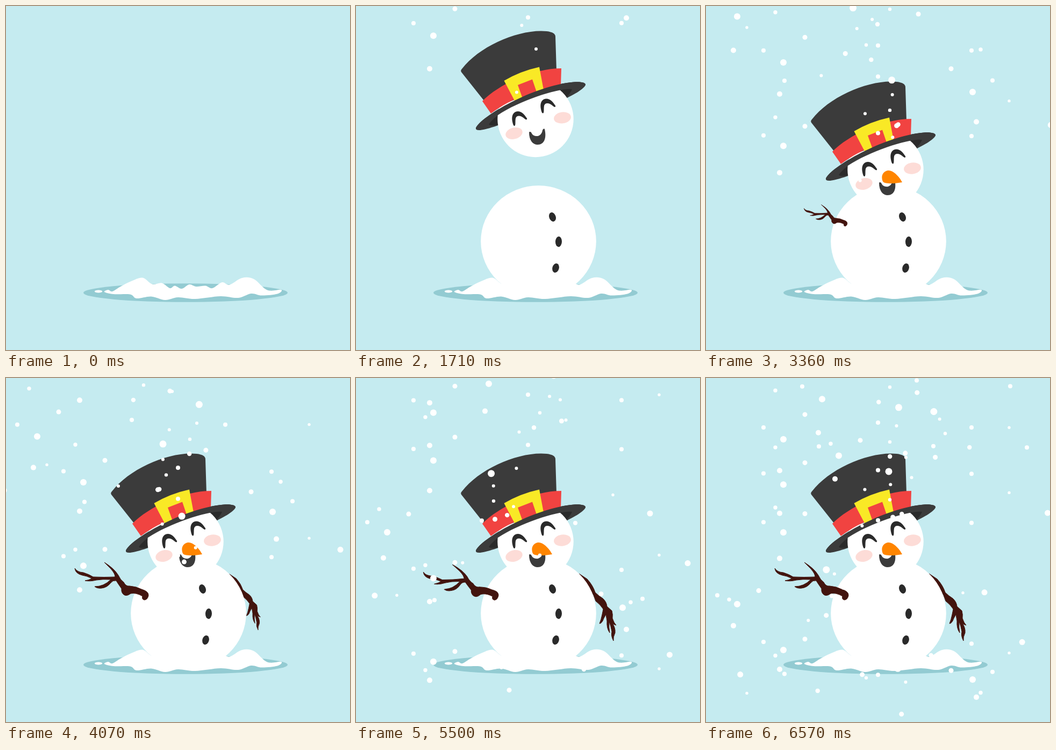
An HTML page with a canvas for the animation above (6.64 s loop, 640 by 640 pixels).

```html
<!DOCTYPE html>
<html lang="en">
<head>
<meta charset="utf-8">
<title>Snowman</title>
<style>
html, body { margin: 0; width: 100%; height: 100%; overflow: hidden; background: #c5ebf0; }
canvas { display: block; width: 100vmin; height: 100vmin; }
</style>
</head>
<body>
<canvas id="stage" width="640" height="640"></canvas>
<script>
const ctx = document.getElementById('stage').getContext('2d');
const SIZE = 640, LOOP = 6640, FPS = 14;
const DARK = '#3b3b3b', INK = '#2a2a2a', RED = '#f14341', WOOD = '#42140e', WHITE = '#fff';

const flake = (x, r, speed, enter, drift = 0) => ({ x, r, speed, enter, drift });

// One flurry: some flakes fall straight, the others drift sideways
const flurry = [
  flake(107, 4, .127, 1462),
  flake(129, 3.7, .157, 2038),
  flake(137, 5, .1177, 722),
  flake(144, 6, .1248, 1272),
  flake(184, 4.5, .133, 1675),
  flake(320, 4, .131, 1552),
  flake(342, 3.2, .151, 2073),
  flake(494, 4, .128, 1467),
  flake(564, 2.7, .17, 2318),
  flake(311, 3, .1, 110, -.0075),
  flake(312, 4.2, .15, 1887, .031),
  flake(363.6, 3, .153, 2278, -.0157),
  flake(367, 6.5, .167, 2532, -.0259),
  flake(398, 4.5, .167, 2023, -.0325),
  flake(685, 5.5, .137, 1741, -.027)
];

// The same flurry is replayed later, sometimes shifted or mirrored
const replays = [
  ...[0, 1244, 2998, 3711, 4386].map(delay => ({ delay })),
  { delay: 804, mirror: true },
  { delay: 1832, dx: -86, dy: -12 },
  { delay: 2258, dx: 103, dy: -235 },
  { delay: 4985, dx: 72 }
];

// Crests and dips around the snow heap
const heap = smoothLoop([
  [183, 532], [190, 528], [198, 531], [213, 522], [233, 512], [254, 505.5], [272, 517.5], [290, 515.5],
  [305, 525], [314, 520.5], [327, 526], [341, 518], [354, 522], [371, 520.5], [384, 525], [402, 514],
  [416, 518.5], [439, 506], [461, 508], [486, 528.5], [512, 528], [505, 535.5], [476, 538.5], [456, 535],
  [432, 543], [399, 540], [352, 545], [320, 542], [296, 547], [270, 540.5], [243, 544], [231, 536.5], [200, 536]
]);

const parts = {
  crown: new Path2D('M196 217Q194 214 197 211C230 168 305 136 355 141Q371 143 371 151L373 215L373 240L250 285Z'),
  band: new Path2D('M235 271C265 240 330 210 382 210L381 243C340 247 290 265 251 294Z'),
  buckle: new Path2D('M275.5 233Q306 215 341 207.5L349 250L296 272Z'),
  hole: new Path2D('M301 241L328 230.5L336 254L310 266Z'),
  brim: new Path2D('M223 321C232 300 330 242 405 235.500C420 234.5 428 237 427 241C420 257 350 285 300 302C270 315 240 325 229 325Q222 325 223 321Z'),
  inside: new Path2D('M247 314Q255 303 270 293L377 249Q395 247 402 249Q398 258 390 265L300 300L264 315Q250 318 247 314Z'),
  front: new Path2D('M223 321C232 300 330 242 405 235.5C420 234.5 428 237 427 241Q415 246 402 248.5C375 247 305 270 264 297Q252 305 248 313L232 322Z'),
  eye: new Path2D('M293 316C288 302 290 291 301 290C309 290 314 297 318 303C319 306 316 306 314 304C306 297 299 297 297 303C296 308 297 313 296 316Q295 318 293 316Z'),
  mouth: new Path2D('M322 329C322 344 329 352 338 352C350 352 355 340 351 323Q349 321 347 325C346 332 341 337 335 336C330 336 327 332 326 329Q323 327 322 329Z'),
  nose: new Path2D('M327.5 321C326 311 335 304 343 306.5C352 309 361 320 365 328C354 330 340 331 333 329C329 328 328 325 327.5 321Z'),
  leftArm: new Path2D('M128 354Q132 361 144 362Q154 365 162 370Q182 371 203 370Q203 364 195 355L183 343Q201 354 209 367Q213 376 219 380Q223 388 230 387Q243 388 252 393Q266 397 265 405Q263 413 257 413Q252 411 254 406Q242 399 232 401Q224 407 219 403Q214 399 215 392Q208 382 205 377Q199 376 195 381Q188 390 178 391Q170 392 165 388Q182 388 195 375Q180 374 168 376Q156 379 147 377Q154 376 160 373Q150 368 142 367Q129 364 128 354Z'),
  rightArm: new Path2D('M415 364L430 374Q441 386 445 399Q451 405 459 410Q466 416 467 425L476 433Q478 440 477 447Q480 456 484 460Q479 459 476 455Q483 464 482 474Q478 482 479 489Q474 480 476 472Q474 460 471 453Q470 464 472 474Q466 466 467 452L465 440Q460 448 459 452Q456 457 453 457Q456 450 458 440L460 430Q455 422 446 415Q443 404 436 394Q430 380 415 364Z')
};

// Closed curve through all points (Catmull-Rom)
function smoothLoop(points) {
  const path = new Path2D();
  const n = points.length;
  const at = i => points[(i + n) % n];
  path.moveTo(...at(0));
  for (let i = 0; i < n; i++) {
    const [a, b, c, d] = [at(i - 1), at(i), at(i + 1), at(i + 2)];
    path.bezierCurveTo(
      b[0] + (c[0] - a[0]) / 6, b[1] + (c[1] - a[1]) / 6,
      c[0] - (d[0] - b[0]) / 6, c[1] - (d[1] - b[1]) / 6,
      c[0], c[1]
    );
  }
  return path;
}

const ramp = (t, from, to) => Math.min(1, Math.max(0, (t - from) / (to - from)));

function fill(path, color) {
  ctx.fillStyle = color;
  ctx.fill(path);
}

function oval(x, y, rx, ry, color, deg = 0) {
  ctx.fillStyle = color;
  ctx.beginPath();
  ctx.ellipse(x, y, rx, ry, deg * Math.PI / 180, 0, Math.PI * 2);
  ctx.fill();
}

// Draws with a scale and turn about a fixed point
function about(x, y, sx, sy, deg, draw) {
  if (sx <= 0) return;
  ctx.save();
  ctx.translate(x, y);
  ctx.rotate(deg * Math.PI / 180);
  ctx.scale(sx, sy);
  ctx.translate(-x, -y);
  draw();
  ctx.restore();
}

function drawArm(path) {
  fill(path, WOOD);
  ctx.strokeStyle = WOOD;
  ctx.lineJoin = 'round';
  ctx.lineWidth = 1;
  ctx.stroke(path);
}

function drawBody() {
  oval(339.5, 437.8, 107.3, 103.7, WHITE);
  oval(365.5, 392.5, 6.2, 8.7, INK, -20);
  oval(377, 438.5, 6, 9.8, INK, 2);
  oval(371.5, 487.5, 6.2, 8.7, INK, 15);
}

function drawHead(t) {
  fill(parts.brim, DARK);
  fill(parts.inside, INK);
  oval(334, 304.5, 70.7, 70.7, WHITE);
  oval(294, 331, 16, 10.5, '#fddcd7', -15);
  oval(384, 302, 16, 10.5, '#fddcd7', -8);
  fill(parts.eye, INK);
  ctx.save();
  ctx.translate(53, -23.5);
  fill(parts.eye, INK);
  ctx.restore();
  fill(parts.mouth, DARK);
  const grow = ramp(t, 2500, 2937);
  about(330, 315, grow, grow, 0, () => fill(parts.nose, '#ff8500'));
  fill(parts.crown, DARK);
  fill(parts.band, RED);
  fill(parts.buckle, '#f9e926');
  fill(parts.hole, RED);
  fill(parts.front, DARK);
}

function drawFlurry(t, { delay, dx = 0, dy = 0, mirror = false }) {
  for (const f of flurry) {
    const age = t - delay - f.enter;
    const x = f.x + f.drift * age;
    const y = f.speed * age + dy;
    if (age < -60 || x > SIZE + f.r) continue;
    oval((mirror ? SIZE - x : x) + dx, y, f.r, f.r, WHITE);
  }
}

function draw(t) {
  ctx.fillStyle = '#c5ebf0';
  ctx.fillRect(0, 0, SIZE, SIZE);
  oval(334, 533.5, 190, 17.3, '#93cbd2');
  fill(heap, WHITE);
  oval(172, 531, 7.2, 2.6, WHITE);

  const right = ramp(t, 3707, 4144);
  about(419, 368, right, right, 0, () => drawArm(parts.rightArm));

  const body = ramp(t, 428, 830);
  const squash = .04 * Math.sin(Math.PI * ramp(t, 1930, 2430));
  about(339.5, 541.5, body * (1 + squash / 2), body * (1 - squash), 0, drawBody);

  const drop = ramp(t, 1070, 1930);
  if (drop > 0) {
    ctx.save();
    ctx.translate(0, -375 * (1 - drop) + 192 * squash);
    drawHead(t);
    ctx.restore();
  }

  const left = ramp(t, 3100, 3540);
  const wave = -2.6 * (1 - Math.cos((t - 4071) / 833 * Math.PI * 2));
  about(260, 405, left, left, wave, () => drawArm(parts.leftArm));

  for (const replay of replays) drawFlurry(t, replay);
}

// Holds each pose for one step of the frame rate
function poseTime(t) {
  const last = Math.floor(LOOP * FPS / 1000);
  let n = Math.floor((t + 5) * FPS / 1000);
  if (Math.round(n * 100 / FPS) * 10 > t) n--;
  return Math.min(n, last) * 1000 / FPS;
}

const begin = performance.now();
function tick() {
  draw(poseTime((performance.now() - begin) % LOOP));
  requestAnimationFrame(tick);
}
tick();
</script>
</body>
</html>
```
